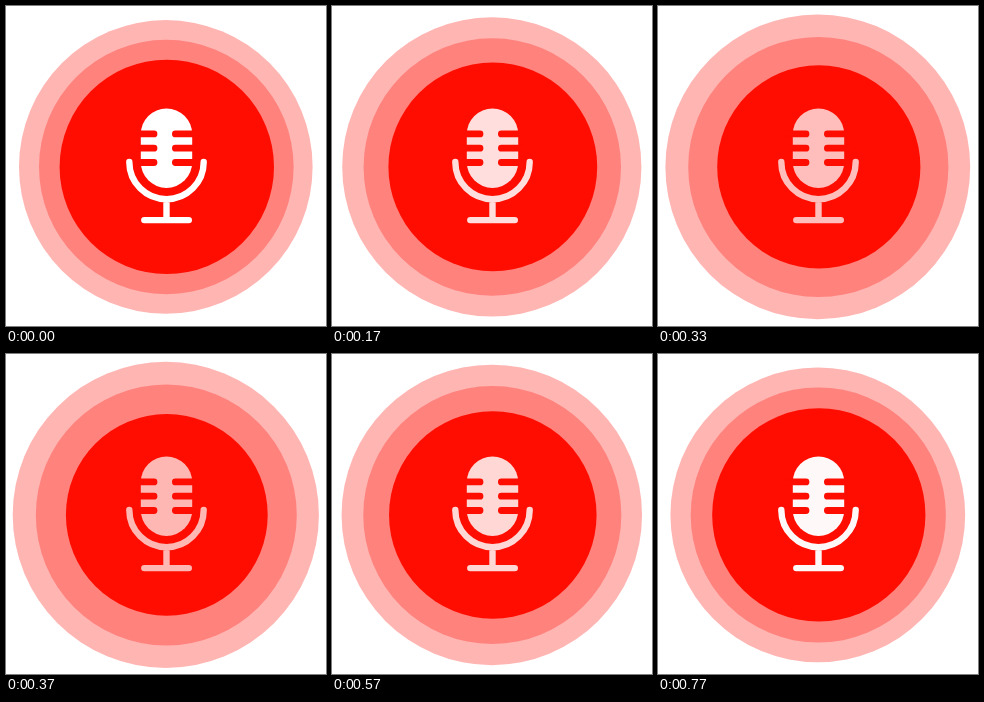
Write an HTML page that moves like this. It is 320 px wide and 320 px high and loops after 0.81 s.

```html
<!DOCTYPE html>
<html lang="en">
<head>
<meta charset="utf-8">
<title>Recording pulse</title>
<style>
  html, body { margin: 0; width: 100%; height: 100%; overflow: hidden; background: #fff; }
  svg { display: block; width: 100vw; height: 100vh; }
  .halo { fill: #ff0d00; fill-opacity: .3; }
  .line { fill: none; stroke: #fff; stroke-width: 6.4; stroke-linecap: round; }
  .notch { fill: none; stroke: #ff0d00; stroke-width: 6.8; stroke-linecap: round; }
</style>
</head>
<body>
<svg viewBox="0 0 320 320">
  <circle id="outer" class="halo" cx="159.8" cy="160.9" r="146.8"/>
  <circle id="middle" class="halo" cx="160.3" cy="161" r="127.3"/>
  <circle id="inner" cx="160.8" cy="160.9" r="107.2" fill="#ff0d00"/>
  <g id="mic">
    <rect x="134.8" y="102.5" width="51.4" height="79.4" rx="25.7" fill="#fff"/>
    <path class="notch" d="M130 127.9H148M130 142.2H148M130 156.5H148M169.4 127.9H191M169.4 142.2H191M169.4 156.5H191"/>
    <path class="line" d="M123.3 156a37.2 37.2 0 0 0 74.4 0M160.5 193.2V214M138.3 214.1H182.8"/>
  </g>
</svg>
<script>
  const LOOP = 810, COUNT = 20, PEAK = 9;
  const pattern = [0, 30, 70, 130, 170]; // step starts, repeating every 200 ms
  const starts = Array.from({ length: COUNT }, (_, i) => pattern[i % 5] + 200 * Math.floor(i / 5));
  const el = id => document.getElementById(id);
  const outer = el('outer'), middle = el('middle'), inner = el('inner'), mic = el('mic');

  function draw(time) {
    const t = time % LOOP;
    let step = COUNT - 1;
    while (starts[step] > t) step--;
    const p = step <= PEAK ? step / PEAK : (COUNT - step) / (COUNT - PEAK);
    outer.setAttribute('r', 146.8 + 6.3 * p);
    middle.setAttribute('r', 127.3 + 3.15 * p);
    inner.setAttribute('r', 107.2 - 6.3 * p);
    mic.setAttribute('opacity', 1 - 0.3 * p);
  }

  const begin = performance.now();
  function tick() {
    draw(performance.now() - begin);
    requestAnimationFrame(tick);
  }
  tick();
</script>
</body>
</html>
```
